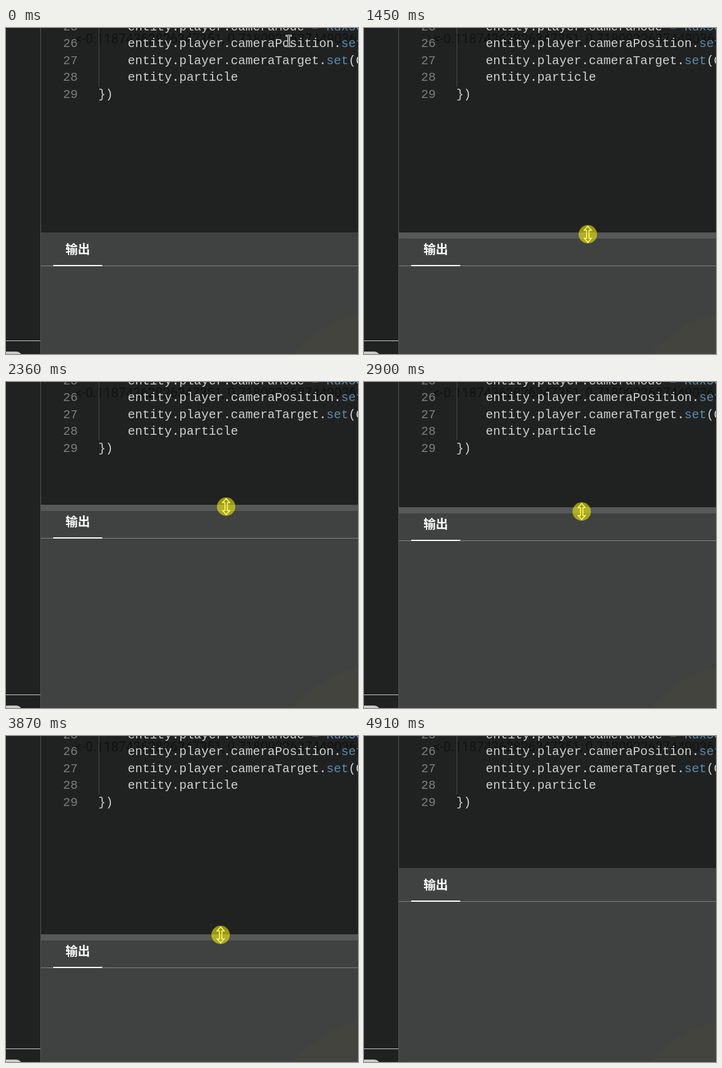
Animation of 574x531 px, one loop 5.11 s. Source, as an HTML page with a canvas:

```html
<!DOCTYPE html>
<html lang="en">
<head>
<meta charset="utf-8">
<title>Resizing the output panel</title>
<style>
  html, body { margin: 0; width: 100%; height: 100%; overflow: hidden; background: #202222; }
  canvas { display: block; }
</style>
</head>
<body>
<canvas id="stage" width="574" height="531"></canvas>
<script>
const ctx = document.getElementById('stage').getContext('2d');
const W = 574, H = 531, LOOP = 5110, STEP = 70;
const CODE_FONT = '20px "Liberation Mono", monospace';
const TEXT = '#d0d1d1', BLUE = '#5b8cab', GREY = '#7c7e7e';
const PRESS = 1180, BAR_END = 4290, RELEASE = 4490, EXIT = 4910;

// Moments at which the 70 ms stepping starts afresh
const RESTARTS = [0, PRESS, 1310, 2830, 3870, RELEASE];

function stepTime(t) {
  const start = RESTARTS.filter(moment => moment <= t).pop();
  return start + Math.floor((t - start) / STEP) * STEP;
}

const clamp = u => Math.min(1, Math.max(0, u));

// Smooth progress from 0 to 1 between two moments
function ease(t, start, end) {
  const u = clamp((t - start) / (end - start));
  return u * u * (3 - 2 * u);
}

// Up, down, and up again
function panelTop(t) {
  return 333 - 137 * ease(t, 1420, 2470) + 129 * ease(t, 2765, 3670)
    - 110 * ease(t, 3840, 4270);
}

// The pointer arrives, drags the panel edge slightly ahead of it, then leaves.
function pointerAt(t) {
  const arrive = ease(t, 0, 630), leave = ease(t, 4420, 4850);
  const settle = ease(t, 630, 910);
  const drift = clamp((t - 1800) / 2490) ** 0.65;
  const edge = panelTop(t + 25) + 1 + 3 * settle;
  return {
    x: Math.round(461 - 96 * arrive - 17 * drift + 124 * leave),
    y: Math.round(edge - 313 * (1 - arrive) - 201 * leave)
  };
}

function rect(color, x, y, w, h) {
  ctx.fillStyle = color;
  ctx.fillRect(x, y, w, h);
}

function disc(color, x, y, radius) {
  ctx.beginPath();
  ctx.arc(x, y, radius, 0, Math.PI * 2);
  ctx.fillStyle = color;
  ctx.fill();
}

function text(string, x, y, color, font = CODE_FONT) {
  ctx.font = font;
  ctx.fillStyle = color;
  ctx.fillText(string, x, y);
}

// Code lines; the part between bars is highlighted.
const CODE = [
  '    entity.player.cameraMode = |Rux5G|',
  '    entity.player.cameraPosition.|set|(',
  '    entity.player.cameraTarget.|set|(G',
  '    entity.particle',
  '})'
];

function drawCodeLine(line, row) {
  const y = 4 + row * 27.4;
  text(25 + row, 93, y, GREY);
  let x = 150.5;
  line.split('|').forEach((part, i) => {
    text(part, x, y, i === 1 ? BLUE : TEXT);
    x += part.length * 12;
  });
}

function drawEditor() {
  rect('#202222', 0, 0, W, H);
  text('<-0.11874362826347351, 0.7180922637449036,', 113, 25, '#111313',
    '21.4px Roboto, sans-serif');
  rect('#484a4a', 151, 0, 1, 95);
  CODE.forEach(drawCodeLine);
}

function drawSidebar() {
  rect('#202222', 0, 0, 56, H);
  rect('#545656', 56, 0, 1, H);
  rect('#c9cbcb', 0, 509, 56, 1);
  ctx.beginPath();
  ctx.roundRect(-8, 527, 34, 20, 9);
  ctx.fillStyle = '#c8c9c9';
  ctx.fill();
}

function drawPanel(top, active) {
  rect('#404241', 57, top, W - 57, H - top);
  disc('#43443e', 620, 660, 200);
  if (active) {
    rect('#575858', 57, top, W - 57, 10);
    // The handle's hairline shows only at some fractional pixel positions.
    if (top % 5 === 2) rect('#adafaf', 57, top - 1, W - 57, 1);
  }
  text('输出', 97, top + 34.5, '#fff',
    'bold 20px "Noto Sans CJK SC", "Noto Sans CJK", sans-serif');
  rect('#828483', 57, top + 54, W - 57, 1);
  rect('#fff', 77, top + 53, 80, 2);
}

// Mirrors one quadrant's corners into a closed symmetrical shape.
function outline(corners, x, y, stroke, width, fill) {
  const right = [...corners, ...corners.slice().reverse().map(([px, py]) => [px, -py])];
  const left = right.slice().reverse().map(([px, py]) => [-px, py]);
  ctx.beginPath();
  [...right, ...left].forEach(([px, py]) => ctx.lineTo(x + px, y + py));
  ctx.closePath();
  ctx.fillStyle = fill;
  ctx.fill();
  ctx.strokeStyle = stroke;
  ctx.lineWidth = width;
  ctx.stroke();
}

function drawPointer(t) {
  if (t >= EXIT) return;
  const { x, y } = pointerAt(t);
  if (t >= 770 && t < RELEASE) {
    outline([[0, -13], [5.8, -6.5], [2, -6.5]], x, y, '#fff', 1.5, 'transparent');
  } else {
    outline([[0, -9.5], [4.5, -9.5], [4.5, -7.5], [1.5, -7.5]], x, y, '#d4d5d5', 1.2, '#4a4c4c');
  }
  if (t >= PRESS && t < RELEASE) disc('rgba(255, 250, 0, 0.55)', x, y, 15);
}

function draw(now) {
  const t = stepTime(now % LOOP);
  drawEditor();
  drawPanel(Math.round(panelTop(t)), t >= PRESS && t < BAR_END);
  drawSidebar();
  drawPointer(t);
  requestAnimationFrame(draw);
}

requestAnimationFrame(draw);
</script>
</body>
</html>
```
